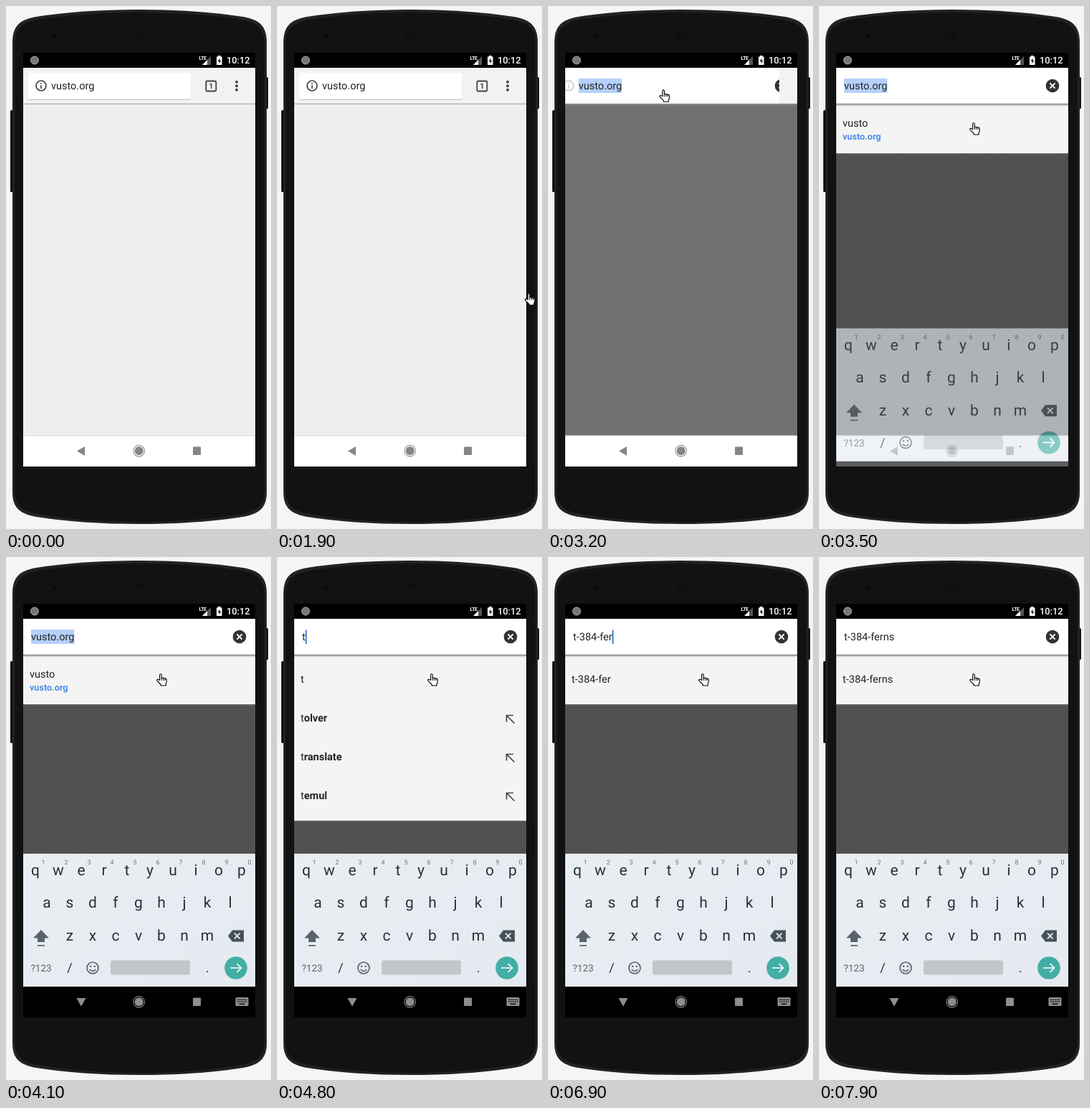
Write an HTML page that moves like this. It is 370 by 728 pixels and loops after 8000 ms.

```html
<!DOCTYPE html>
<html lang="en">
<head>
<meta charset="utf-8">
<title>Phone search</title>
<style>
  html, body { margin: 0; width: 100%; height: 100%; overflow: hidden; background: #f5f5f5; }
  svg { display: block; width: 370px; height: 728px; font-family: Roboto, sans-serif; text-rendering: geometricPrecision; }
  text { font-size: 14.5px; fill: #222; white-space: pre; }
  .bold { font-weight: 600; }
  .key { font-size: 21px; fill: #263238; text-anchor: middle; }
  .hint { font-size: 9px; fill: #6d7478; text-anchor: middle; }
  .line { fill: none; stroke-width: 1.7; }
</style>
</head>
<body>
<svg viewBox="0 0 370 728">
  <defs>
    <clipPath id="screenClip"><rect x="24" y="65" width="324" height="576"/></clipPath>
    <clipPath id="fieldClip"><rect class="fieldBox"/></clipPath>
    <linearGradient id="shade" x2="0" y2="1">
      <stop stop-color="#777" stop-opacity=".85"/><stop offset="1" stop-color="#999" stop-opacity="0"/>
    </linearGradient>
    <linearGradient id="keys" x2="1" y2="1">
      <stop stop-color="#e9eef3"/><stop offset="1" stop-color="#e4eaf0"/>
    </linearGradient>
  </defs>

  <!-- Phone body -->
  <rect x="6" y="145" width="5" height="114" rx="1.5" fill="#111"/>
  <rect x="362" y="99" width="4" height="44" rx="1.5" fill="#111"/>
  <path fill="#222" d="M9 51C9 27 20 19 42 15Q105 5 186 5T331 15C353 19 364 27 364 51V677C364 699 353 707 331 711Q268 721 186 721T42 711C20 707 9 699 9 677Z"/>
  <path fill="#121212" d="M12 53C12 31 23 23 44 19Q106 9 186 9T329 19C350 23 361 31 361 53V675C361 695 350 703 329 707Q267 718 186 718T44 707C23 703 12 695 12 675Z"/>
  <circle cx="68" cy="42" r="2.5" fill="#0a0a0a"/>
  <path d="M179 38h15M179 41h15M179 44h15" stroke="#0b0b0b" stroke-width="1.3" stroke-dasharray="2 1"/>

  <g clip-path="url(#screenClip)">
    <rect x="24" y="65" width="324" height="576" fill="#eee"/>

    <!-- Status bar -->
    <rect x="24" y="65" width="324" height="21"/>
    <circle cx="40" cy="75.5" r="5.5" fill="#777" stroke="#aaa"/>
    <text x="269.5" y="75" style="font-size:7px;font-weight:700;fill:#fff;letter-spacing:-.4px">LTE</text>
    <path d="M286 70V82H274Z" fill="#555"/><path d="M281 75V82H274Z" fill="#fff"/>
    <path d="M296 69h3.5v1.5h2V82h-7.5V70.5h2Z" fill="#fff"/>
    <path d="M298.4 72.5l-2.5 4.4h1.7v3.4l2.5-4.4h-1.7z"/>
    <text x="308" y="80" style="font-size:12.8px;font-weight:500;fill:#fff">10:12</text>

    <!-- Page, scrim and toolbar -->
    <rect id="scrim" x="24" y="137" width="324" height="461"/>
    <rect x="24" y="86" width="324" height="51" fill="#f2f2f2"/>
    <g id="tools" fill="#444">
      <rect x="279.3" y="104.5" width="14" height="14" rx="1.5" fill="none" stroke="#444" stroke-width="1.8"/>
      <text x="286.3" y="115.3" text-anchor="middle" style="font-size:10.5px;font-weight:700;fill:#444">1</text>
      <circle cx="322" cy="105.7" r="2"/><circle cx="322" cy="111.2" r="2"/><circle cx="322" cy="116.7" r="2"/>
    </g>
    <rect id="fieldShadow" x="31" y="94" width="227" height="37" rx="2" fill="#d2d2d2"/>
    <rect class="fieldBox" fill="#fff"/>
    <g clip-path="url(#fieldClip)">
      <g id="info">
        <circle cx="49" cy="111" r="7" class="line" stroke="#444" stroke-width="1.5"/>
        <path d="M49 107v1.8M49 110.2v5" stroke="#444" stroke-width="1.7"/>
      </g>
      <g id="clear">
        <circle cx="326" cy="111" r="9.3" fill="#333"/>
        <path d="M322.4 107.4l7.2 7.2m0-7.2l-7.2 7.2" stroke="#fff" stroke-width="1.9"/>
      </g>
    </g>
    <rect id="highlight" y="101" height="20" fill="#b5d0fb"/>
    <text id="query" y="116"></text>
    <rect id="caret" y="101.5" width="1.8" height="19.5" fill="#2f74cf"/>
    <g id="list"></g>
    <rect x="24" y="135.7" width="324" height="1.2" fill="#a8a8a8"/>
    <rect id="toolbarShade" x="24" y="136" width="324" height="4" fill="url(#shade)"/>

    <!-- Light navigation bar -->
    <rect x="24" y="598" width="324" height="43" fill="#fff"/>
    <rect x="24" y="597.6" width="324" height="1" fill="#d8d8d8"/>
    <g fill="#858585"><path d="M110 613V626L99 619.5Z"/><use href="#home"/></g>

    <!-- Keyboard with dark navigation bar -->
    <g id="ime">
      <rect x="24" y="413" width="324" height="185" fill="url(#keys)"/>
      <g id="letters"></g>
      <path d="M49 519L60 530.5H54V536H44V530.5H38Z" fill="#59646a"/>
      <rect x="44" y="540" width="10" height="1.7" fill="#59646a"/>
      <path d="M316 519.5H332V535.5H316L310 527.5Z" fill="#465157"/>
      <path d="M319 523.7l7.6 7.6m0-7.6l-7.6 7.6" stroke="#e8edf2" stroke-width="1.8"/>
      <text x="49" y="577" text-anchor="middle" style="font-size:13.5px;fill:#59646a">?123</text>
      <text x="89" y="578" class="key" style="font-size:18px">/</text>
      <circle cx="121" cy="572" r="8" class="line" stroke="#59646a"/>
      <path d="M116.8 574q4.2 5 8.4 0" class="line" stroke="#59646a"/>
      <circle cx="118.2" cy="569.7" r="1.3" fill="#59646a"/><circle cx="123.8" cy="569.7" r="1.3" fill="#59646a"/>
      <rect x="146" y="561.5" width="111" height="20" rx="2.5" fill="#c1c6ca"/>
      <text x="281" y="578" class="key" style="font-size:18px">.</text>
      <circle cx="321" cy="572" r="15.8" fill="#43aea5"/>
      <path d="M313 572H328M322.5 566L328.5 572L322.5 578" class="line" stroke="#fff" stroke-width="2"/>
      <rect x="24" y="598" width="324" height="43"/>
      <g fill="#8e8e8e">
        <path d="M98.5 614H111.5L105 625.5Z"/>
        <g id="home">
          <circle cx="185.7" cy="619.3" r="6"/>
          <circle cx="185.7" cy="619.3" r="7.8" fill="none" stroke="#8b8b8b" stroke-width="1.1"/>
          <rect x="261" y="613.5" width="11" height="11.5" rx="1"/>
        </g>
        <rect x="320.5" y="613" width="18" height="12" rx="1.5"/>
      </g>
      <path d="M323 616.2H336.5M323 619H336.5" stroke="#000" stroke-width="1.5" stroke-dasharray="1.6 1.3"/>
      <path d="M325.5 622.3H333.5" stroke="#000" stroke-width="1.4"/>
    </g>
  </g>

  <g id="hand" stroke="#000" stroke-linejoin="round">
    <path fill="#fff" stroke-width="1.1" d="M4.6 9.5V2.2Q4.7.7 5.9.7T7.2 2.2V7Q7.3 5.9 8.5 6T9.7 7.3Q9.8 6.4 10.9 6.5T12 7.8Q12.2 7 13.1 7.2T14.2 8.6V11.5Q14.2 13 13.1 14.3V17H6.2V15.5L1.2 10.7Q.1 9.2 1.2 8.5T3.4 9Z"/>
    <path fill="none" d="M7.2 7V10M9.7 7.3V10M12 7.8V10"/>
  </g>
</svg>
<script>
const LOOP = 8000;
const $ = id => document.getElementById(id);
const svgNS = 'http://www.w3.org/2000/svg';

function add(parent, tag, attrs, content = '') {
  const el = document.createElementNS(svgNS, tag);
  set(el, attrs);
  el.textContent = content;
  return parent.appendChild(el);
}
function set(el, attrs) {
  for (const name in attrs) el.setAttribute(name, attrs[name]);
}
const show = (el, on) => set(el, { visibility: on ? 'visible' : 'hidden' });

// Linear interpolation through rows of [time, ...values].
function at(t, rows) {
  if (t <= rows[0][0]) return rows[0].slice(1);
  const i = rows.findIndex(row => row[0] > t);
  if (i < 0) return rows[rows.length - 1].slice(1);
  const [a, b] = [rows[i - 1], rows[i]];
  const k = (t - a[0]) / (b[0] - a[0]);
  return a.slice(1).map((v, n) => v + (b[n + 1] - v) * k);
}

// Keyboard letters
[['qwertyuiop', 41, 443], ['asdfghjkl', 57, 488], ['zxcvbnm', 89, 534]].forEach(([row, x0, y], r) => {
  [...row].forEach((letter, i) => {
    const x = x0 + i * 32;
    add($('letters'), 'text', { x, y, class: 'key' }, letter);
    if (r === 0) add($('letters'), 'text', { x: x + 11, y: 428, class: 'hint' }, (i + 1) % 10);
  });
});

const SITE = 'vusto.org';
const TYPED = 't-384-ferns';
const KEY_TIMES = [4500, 4950, 5200, 5400, 5600, 5900, 6400, 6600, 6850, 7050, 7300];
const FIRST = [['t', 'olver'], ['t', 'ranslate'], ['t', 'emul']];
const SECOND = [['', 't384 gumvosa'], ['', 't384 hevolo'], ['', 't384 drivers']];

const CURSOR = [
  [1900, 346, 400], [2000, 318, 330], [2100, 282, 262], [2200, 282, 262], [2400, 215, 165],
  [2600, 165, 117], [2800, 152, 109], [3100, 152, 109], [3200, 155, 116], [3300, 178, 137],
  [3400, 202, 157], [3480, 210, 162]
];
const EXPAND = [[3090, 0], [3200, .72], [3320, 1]];
const SCRIM = [[3090, 0], [3200, .53], [3320, .66]];
const KEYBOARD = [[3400, 90, 0], [3500, 36, .63], [3600, 8, .93], [3680, 0, 1]];

let listState = '';
function drawList(count, visible) {
  const state = visible + ':' + count;
  if (state === listState) return;
  listState = state;
  const list = $('list');
  list.replaceChildren();
  if (!visible) return;
  const rows = count === 0 || count > 6 ? [] : count < 4 ? FIRST : SECOND;
  const height = rows.length ? 230 : 68;
  add(list, 'rect', { x: 24, y: 137, width: 324, height, fill: '#f4f4f4' });
  add(list, 'rect', { x: 24, y: 137 + height, width: 324, height: 2.5, fill: 'url(#shade)', opacity: .6 });
  if (count === 0) {
    add(list, 'text', { x: 33, y: 168 }, SITE.split('.')[0]);
    add(list, 'text', { x: 33, y: 186, class: 'bold', style: 'font-size:12.6px;fill:#4a8eea' }, SITE);
    return;
  }
  add(list, 'text', { x: 33, y: 175 }, TYPED.slice(0, count));
  rows.forEach(([plain, bold], i) => {
    const y = 229 + i * 54;
    const line = add(list, 'text', { x: 33, y }, plain);
    add(line, 'tspan', { class: 'bold' }, bold);
    add(list, 'path', { d: `M320.5 ${y + .5}V${y - 8.5}H330M321 ${y - 8}L331.5 ${y + 2.5}`, class: 'line', stroke: '#444' });
  });
}

function draw(t) {
  const [p] = at(t, EXPAND);
  const grow = Math.min(1, p * 1.38);
  const count = KEY_TIMES.filter(time => time <= t).length;
  const textX = 63 - 28 * p;

  const left = 31 - 7 * grow, top = 93 - 7 * grow;
  document.querySelectorAll('.fieldBox').forEach(box => set(box, {
    x: left, y: top, width: 258 + 90 * p - left, height: 36.5 + 13.5 * grow, rx: 2 * (1 - grow)
  }));
  show($('fieldShadow'), p === 0);
  set($('tools'), { opacity: Math.max(0, 1 - 2 * p) });
  set($('info'), { opacity: 1 - p, transform: `translate(${-28 * p})` });
  show($('clear'), p > 0);
  set($('scrim'), { opacity: at(t, SCRIM)[0] });
  set($('toolbarShade'), { opacity: p });

  const query = $('query');
  const value = count ? TYPED.slice(0, count) : SITE;
  if (query.textContent !== value) query.textContent = value;
  set(query, { x: textX });
  const width = query.getComputedTextLength();
  set($('highlight'), { x: textX, width });
  show($('highlight'), p > 0 && !count);
  set($('caret'), { x: textX + width });
  show($('caret'), count && (t - KEY_TIMES[count - 1]) % 1000 < 500);

  drawList(count, t >= 3380);

  const [dy, alpha] = at(t, KEYBOARD);
  set($('ime'), { transform: `translate(0 ${dy})`, opacity: alpha });

  const [x, y] = at(t, CURSOR);
  set($('hand'), { transform: `translate(${x} ${y})` });
  show($('hand'), t >= 1900);
}

function tick() {
  draw(performance.now() % LOOP);
  requestAnimationFrame(tick);
}
tick();
</script>
</body>
</html>
```
